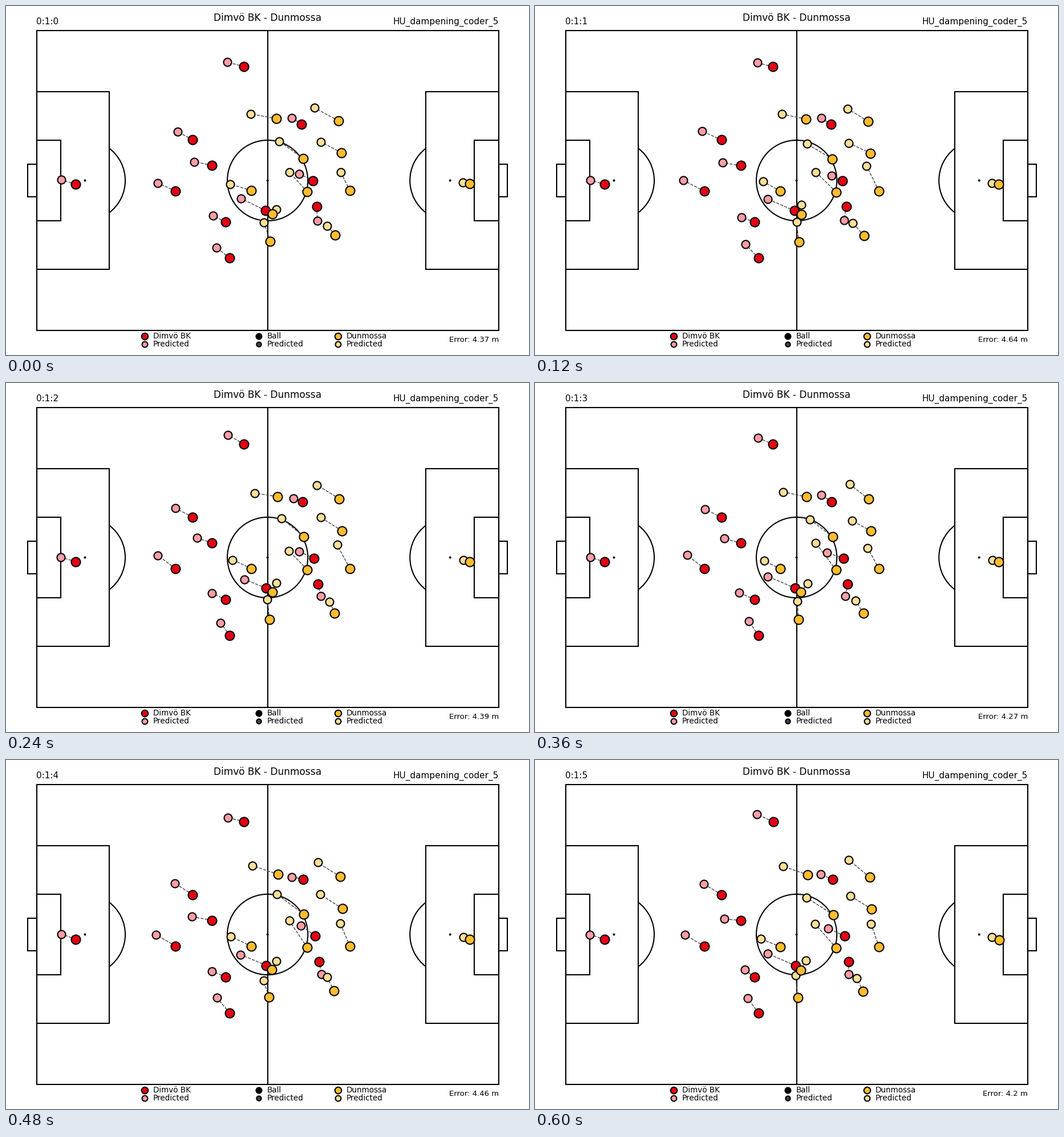
Recreate the animation shown at these times as a matplotlib script. Size 917 by 611 pixels, loop 720 ms.

```python
import matplotlib.pyplot as plt
import numpy as np
from matplotlib.animation import FuncAnimation
from matplotlib.patches import Arc, Circle, Rectangle

W, H, DPI = 917, 611, 64
PX = 72 / DPI  # points per pixel
STEPS, STEP_MS = 6, 120
RED, PINK = "#e50013", "#ff9da6"
GOLD, CREAM = "#fcbd2c", "#fbdf96"
HOME, AWAY = "Dimvö BK", "Dunmossa"
ERRORS = ("4.37", "4.64", "4.39", "4.27", "4.46", "4.2")

plt.rcParams["font.family"] = "DejaVu Sans"
fig = plt.figure(figsize=(W / DPI, H / DPI), dpi=DPI, facecolor="white")
ax = fig.add_axes([0, 0, 1, 1])
ax.set(xlim=(0, W), ylim=(H, 0))
ax.axis("off")


def label(x, y, text, size, align="left"):
    return ax.text(x, y, text, fontsize=size * PX, ha=align, va="baseline")


def dots(x, y, color, size, z):
    return ax.plot(x, y, "o", color=color, ms=size * PX, mec="black",
                   mew=2.08 * PX, zorder=z)[0]


# Pitch, laid out in metres from the goal lines
LEFT, RIGHT, TOP, BOTTOM = 53.6, 863.7, 43, 568
MID_X, MID_Y = (LEFT + RIGHT) / 2, (TOP + BOTTOM) / 2
M = (RIGHT - LEFT) / 105
LINE = dict(fill=False, ec="black", lw=2.08 * PX, zorder=1)


def box(x0, x1, width):
    ax.add_patch(Rectangle((x0, MID_Y - width * M / 2), x1 - x0, width * M, **LINE))


def spot(x):
    ax.add_patch(Circle((x, MID_Y), 2, color="black", lw=0, zorder=1))


ax.add_patch(Rectangle((LEFT, TOP), RIGHT - LEFT, BOTTOM - TOP, **LINE))
ax.plot([MID_X, MID_X], [TOP, BOTTOM], color="black", lw=2.08 * PX, zorder=1)
ax.add_patch(Circle((MID_X, MID_Y), 9.15 * M, **LINE))
spot(MID_X)
half_arc = np.degrees(np.arccos(5.5 / 9.15))
for goal, side in ((LEFT, 1), (RIGHT, -1)):
    for depth, width in ((16.5, 40.32), (5.5, 18.32), (-2, 7.32)):
        box(goal, goal + side * depth * M, width)
    spot(goal + side * 11 * M)
    ax.add_patch(Arc((goal + side * 11 * M, MID_Y), 18.3 * M, 18.3 * M,
                     angle=0 if side > 0 else 180,
                     theta1=-half_arc, theta2=half_arc, **LINE))

# Captions and legend
label(458.5, 26, f"{HOME} - {AWAY}", 17, "center")
label(864, 32, "HU_dampening_coder_5", 15.3, "right")
clock = label(53, 32, "", 15.3)
error = label(864, 588, "", 13.2, "right")
for x, name, real, guess, size in ((243, HOME, RED, PINK, 11.5),
                                   (443, "Ball", "black", "#444444", 10),
                                   (582, AWAY, GOLD, CREAM, 11.5)):
    for y, text, color, d in ((578, name, real, size), (592, "Predicted", guess, size - 1.7)):
        dots([x], [y], color, d, 5)
        label(x + 14.5, y + 4, text, 13.5)


class Team:
    """Players run steadily; each prediction jitters around its own anchor."""

    def __init__(self, colors, z, players, drift, seed):
        self.start, self.anchor = np.array(players, float).swapaxes(0, 1)
        self.drift = np.column_stack(np.broadcast_arrays(*drift(*self.start.T)))
        self.jitter = np.random.default_rng(seed).normal(0, 3, (STEPS, *self.start.shape))
        self.jitter[:, 0] *= 0.2  # the keeper hardly moves
        self.links, = ax.plot([], [], "--", color="#444444", lw=1.4 * PX, zorder=2)
        self.guess = dots([], [], colors[1], 14, z)
        self.real = dots([], [], colors[0], 16, z + 1)

    def show(self, step):
        real = self.start + self.drift * step / (STEPS - 1)
        guess = self.anchor + self.jitter[step]
        gaps = np.full_like(real, np.nan)
        self.real.set_data(*real.T)
        self.guess.set_data(*guess.T)
        self.links.set_data(*np.stack([real, guess, gaps], axis=1).reshape(-1, 2).T)


# Position and mean prediction of each player, keeper first
home = Team((RED, PINK), 3, [
    ((122, 312), (97, 305)), ((417, 106), (389, 97)), ((327, 234), (298, 220)),
    ((361, 279), (332, 275)), ((297, 324), (264, 305)), ((385, 378), (362, 371)),
    ((392, 441), (372, 418)), ((455, 358), (411, 342)), ((518, 207), (501, 199)),
    ((538, 306), (516, 295)), ((545, 351), (548, 374)),
], lambda x, y: (np.maximum(0, (x - 400) / 30), 2), seed=5)

away = Team((GOLD, CREAM), 3.5, [
    ((813, 311), (802, 310)), ((474, 197), (433, 190)), ((583, 201), (548, 179)),
    ((588, 257), (555, 235)), ((603, 323), (584, 287)), ((521, 267), (477, 237)),
    ((528, 325), (494, 286)), ((430, 323), (395, 310)), ((467, 364), (474, 352)),
    ((463, 412), (455, 380)), ((577, 401), (562, 384)),
], lambda x, y: ((330 - y) / 35, 4), seed=8)


def update(step):
    clock.set_text(f"0:1:{step}")
    error.set_text(f"Error: {ERRORS[step]} m")
    home.show(step)
    away.show(step)


anim = FuncAnimation(fig, update, frames=STEPS, interval=STEP_MS,
                     init_func=lambda: None, repeat=True, repeat_delay=0)
plt.show()
```
